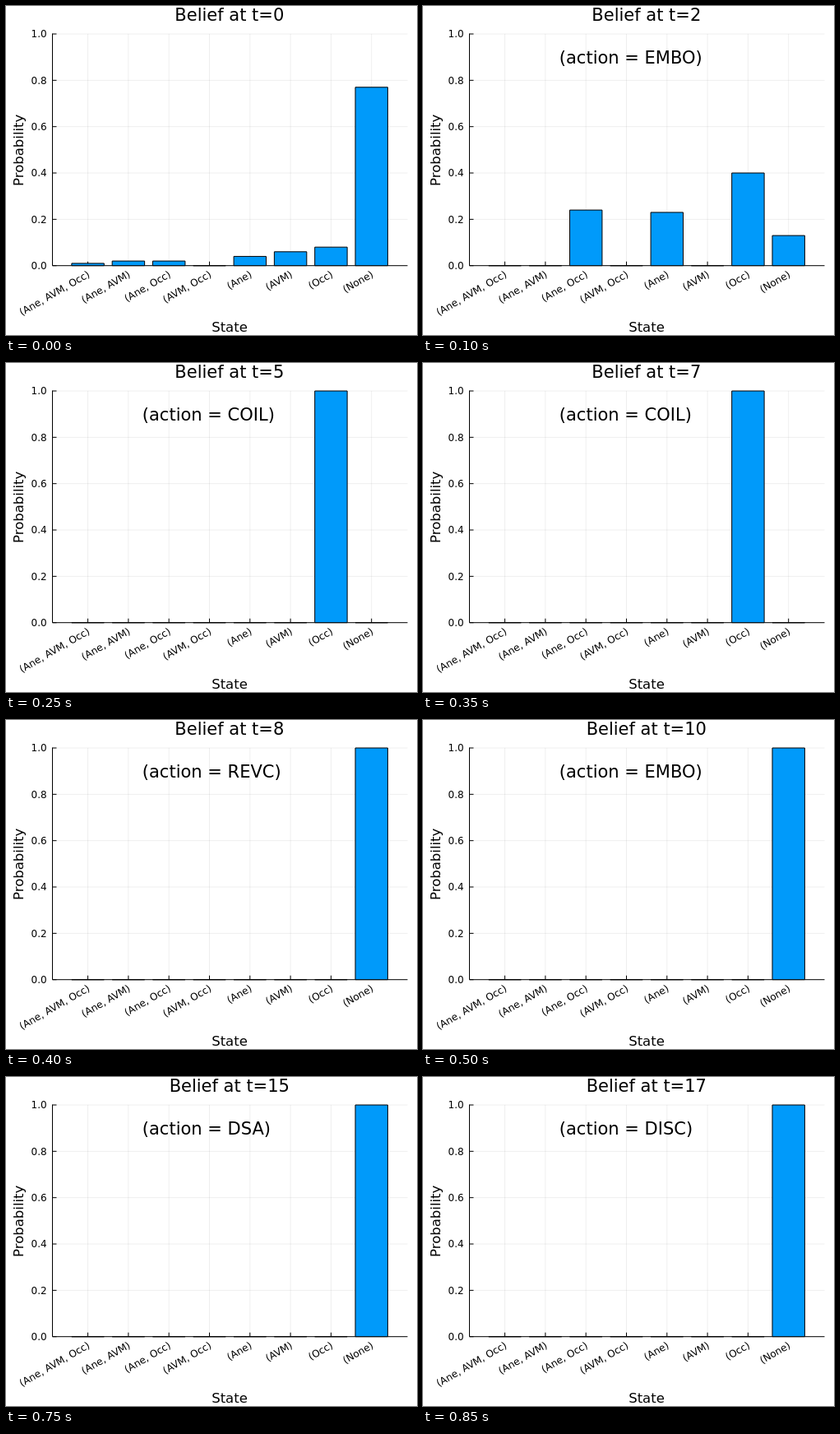
Recreate the animation shown at these times as an HTML page. Size 500x400 px, loop 900 ms.

```html
<!DOCTYPE html>
<html lang="en">
<head>
<meta charset="utf-8">
<title>Belief chart</title>
<style>
html, body { margin: 0; width: 100%; height: 100%; overflow: hidden; background: #fff; }
svg { display: block; width: 500px; height: 400px; font-family: "DejaVu Sans", sans-serif; }
.head { font-size: 21px; }
.guide { font-size: 16.5px; }
.tick { font-size: 12px; text-anchor: end; }
.mid { text-anchor: middle; }
.grid { stroke: #000; stroke-opacity: .065; fill: none; }
.axis { stroke: #000; fill: none; }
.bar { fill: #009afa; stroke: #000; }
</style>
</head>
<body>
<svg viewBox="0 0 500 400">
  <g id="plot"></g>
  <text id="title" class="head mid" x="271.8" y="18"></text>
  <text id="action" class="head" x="165.8" y="70"></text>
  <text class="guide mid" x="272" y="395.5">State</text>
  <text class="guide mid" transform="translate(20.5 175.3) rotate(-90)">Probability</text>
</svg>
<script>
const STEP = 50, COUNT = 18;
const LEFT = 56.5, RIGHT = 488.5, TOP = 34, BASE = 315.7;
const PITCH = 49.3, HALF = PITCH * 0.4;
const states = ['(Ane, AVM, Occ)', '(Ane, AVM)', '(Ane, Occ)', '(AVM, Occ)',
  '(Ane)', '(AVM)', '(Occ)', '(None)'];
const actions = ['', 'HOSP', 'EMBO', 'DSA', 'DSA', 'COIL', 'EMBO', 'COIL', 'REVC',
  'DSA', 'EMBO', 'DSA', 'COIL', 'DSA', 'COIL', 'DSA', 'EMBO', 'DISC'];
const early = [
  [.01, .02, .02, 0, .04, .06, .08, .77],
  [.04, .04, .12, 0, .14, .05, .23, .38],
  [0, 0, .24, 0, .23, 0, .40, .13],
  [0, 0, .01, 0, 0, 0, .99, 0]
];
const OCC = 6, NONE = 7, CURED = 8;

const $ = id => document.getElementById(id);
const xAt = i => 99.6 + i * PITCH;
const yAt = p => BASE - p * (BASE - TOP);

function add(tag, attrs, text = '') {
  const el = document.createElementNS('http://www.w3.org/2000/svg', tag);
  for (const key in attrs) el.setAttribute(key, attrs[key]);
  el.textContent = text;
  return $('plot').appendChild(el);
}
const path = (cls, d) => add('path', { class: cls, d });

function belief(t) {
  if (early[t]) return early[t];
  const sure = t < CURED ? OCC : NONE;
  return states.map((_, i) => +(i === sure));
}

const levels = [0, .2, .4, .6, .8, 1];
states.forEach((_, i) => path('grid', `M${xAt(i)} ${BASE}V${TOP}`));
levels.forEach(p => path('grid', `M${LEFT} ${yAt(p)}H${RIGHT}`));
path('axis', `M${LEFT} ${TOP - .5}V${BASE}H${RIGHT}`);
levels.forEach(p => {
  path('axis', `M${LEFT} ${yAt(p)}h5`);
  add('text', { class: 'tick', x: 49.7, y: yAt(p) + 4.4 }, p.toFixed(1));
});
states.forEach((name, i) => {
  path('axis', `M${xAt(i)} ${BASE}v-5`);
  add('text', { class: 'tick', transform: `translate(${xAt(i) + 3.2} 328.6) rotate(-30)` }, name);
});
const bars = states.map(() => path('bar', ''));

let shown = -1;
function draw(t) {
  $('title').textContent = 'Belief at t=' + t;
  $('action').textContent = t ? `(action = ${actions[t]})` : '';
  belief(t).forEach((p, i) => {
    const x = xAt(i);
    bars[i].setAttribute('d', `M${x - HALF} ${BASE}V${yAt(p)}H${x + HALF}V${BASE}Z`);
  });
}
function tick() {
  const t = Math.floor(performance.now() / STEP) % COUNT;
  if (t !== shown) draw(shown = t);
  requestAnimationFrame(tick);
}
tick();
</script>
</body>
</html>
```
